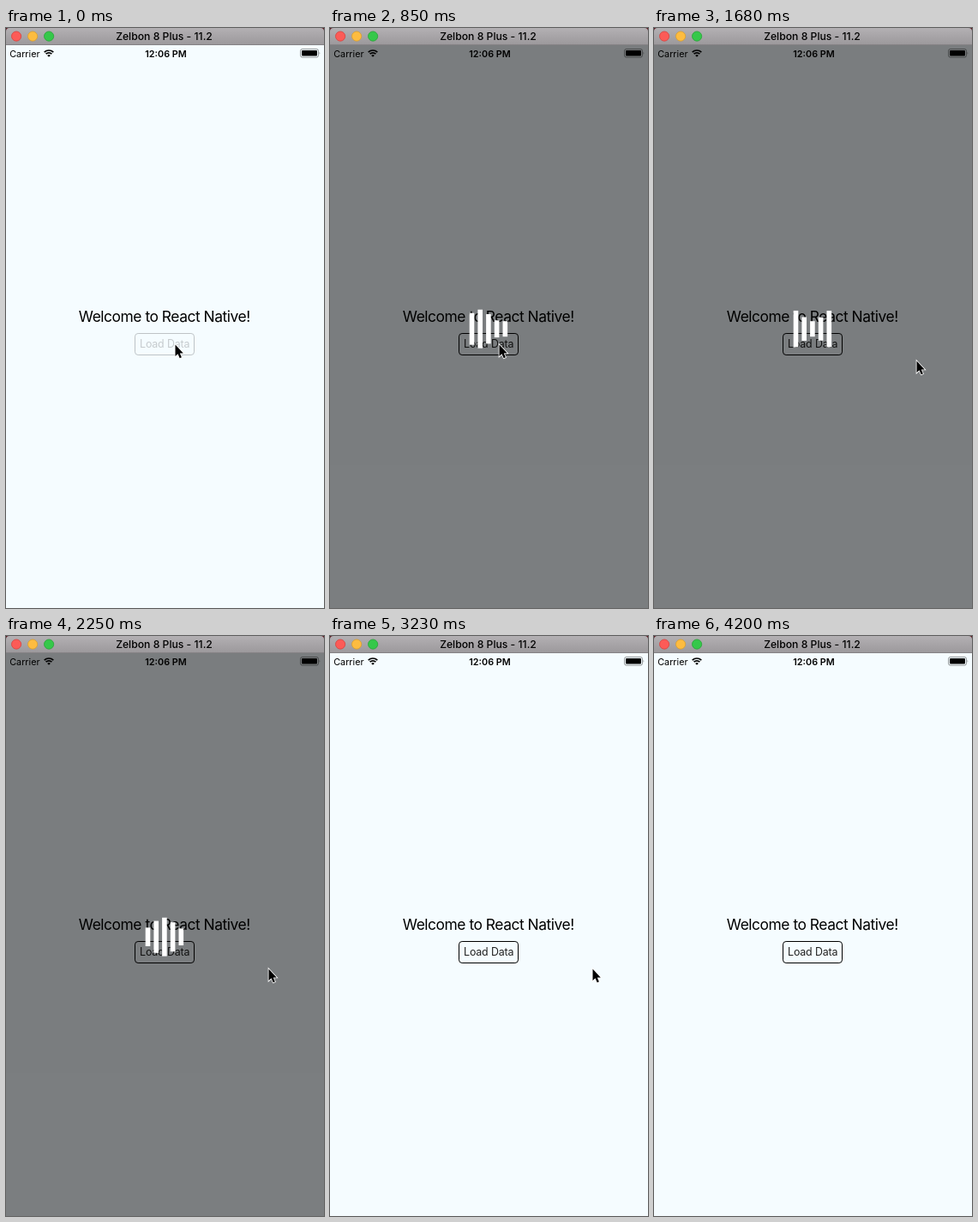
These frames come from a looping animation (371x675 px, 4.48 s). An HTML page:

```html
<!DOCTYPE html>
<html lang="en">
<head>
<meta charset="utf-8">
<title>Loading overlay</title>
<style>
  html, body { margin: 0; width: 100%; height: 100%; overflow: hidden; background: #f5fcff; }
  svg { display: block; width: 371px; height: 675px; }
  text { font-family: Inter, Roboto, sans-serif; text-anchor: middle; }
</style>
</head>
<body>
<svg viewBox="0 0 371 675">
  <defs>
    <linearGradient id="chrome" x2="0" y2="1">
      <stop stop-color="#b3b0b3"/>
      <stop offset="1" stop-color="#9b989b"/>
    </linearGradient>
  </defs>
  <rect width="371" height="675" fill="#f5fcff"/>

  <!-- window title bar -->
  <rect width="371" height="6" fill="#5a1a22"/>
  <path d="M0 20V4Q0 0 4 0H367Q371 0 371 4V20Z" fill="url(#chrome)"/>
  <path d="M0 19.5H371" stroke="#858285"/>
  <g stroke-width=".8">
    <circle cx="12.1" cy="9.6" r="5.6" fill="#fc5b57" stroke="#d8403d"/>
    <circle cx="31.1" cy="9.6" r="5.6" fill="#fdbc40" stroke="#d99f2c"/>
    <circle cx="50.1" cy="9.6" r="5.6" fill="#35c84a" stroke="#26a437"/>
  </g>
  <text x="184.5" y="14.3" font-size="12.2" font-weight="500">Zelbon 8 Plus - 11.2</text>

  <!-- status bar -->
  <text x="4.2" y="33.6" font-size="10.8" style="text-anchor:start">Carrier</text>
  <g fill="none" stroke="#000" stroke-width="1.7">
    <path d="M44.7 28.2A7.5 7.5 0 0 1 55.3 28.2M46.6 30.2A4.8 4.8 0 0 1 53.4 30.2"/>
    <path d="M50 33.8L48.2 32A2.5 2.5 0 0 1 51.8 32Z" fill="#000" stroke="none"/>
  </g>
  <text x="186.5" y="33.6" font-size="10.8" font-weight="600">12:06 PM</text>
  <rect x="343.5" y="24.5" width="21" height="9.6" rx="2.2" fill="none" stroke="#000" stroke-opacity=".4"/>
  <rect x="345" y="26" width="18" height="6.6" rx="1" fill="#000"/>
  <path d="M365.6 27.6Q367 29.3 365.6 31Z" fill-opacity=".5"/>

  <!-- app -->
  <text x="184.8" y="341.6" font-size="17.4" letter-spacing="-.46">Welcome to React Native!</text>
  <g id="button">
    <rect x="150.5" y="355.5" width="69" height="25" rx="3.6" fill="none" stroke="#000"/>
    <text x="185.2" y="372.2" font-size="12.4" letter-spacing="-.13" fill="#222">Load Data</text>
  </g>
  <g id="overlay">
    <rect y="20" width="371" height="655" fill-opacity=".5"/>
    <g id="bars" fill="#fff"></g>
  </g>
  <path id="cursor" d="M0 0V13.6L3 10.8L5.2 15.8L7.4 14.8L5.3 10H9.3Z"
        stroke="#fff" stroke-width="1.6" paint-order="stroke"/>
</svg>
<script>
const STEP = 140, LOOP = 32 * STEP, SHOW = 2 * STEP, HIDE = 23 * STEP, LEAVE = 30 * STEP;
const BARS = 5, LOW = 18, HIGH = 45, BEAT = 1200, LAG = 240;
const $ = id => document.getElementById(id);

// pointer stops: time, x, y
const stops = [
  [980, 197.5, 368.5], [1500, 306.5, 387.5], [3360, 306.5, 387.5],
  [3640, 279.5, 387.5], [3780, 275.5, 410.5], [4060, 308.5, 670.5]
];

const bars = Array.from({ length: BARS }, (_, i) => {
  const bar = document.createElementNS("http://www.w3.org/2000/svg", "rect");
  bar.setAttribute("x", 162.7 + 9.7 * i);
  bar.setAttribute("width", 5.6);
  return $("bars").appendChild(bar);
});

function barHeight(time) {
  const swing = (1 - Math.cos(2 * Math.PI * Math.max(0, time) / BEAT)) / 2;
  return LOW + (HIGH - LOW) * swing;
}

// glide from stop to stop, slowing down on arrival
function pointerAt(t) {
  let [, x, y] = stops[0];
  for (let i = 1; i < stops.length; i++) {
    const [from] = stops[i - 1], [to, nextX, nextY] = stops[i];
    const p = Math.min(1, Math.max(0, (t - from) / (to - from)));
    const eased = p * (2 - p);
    x += (nextX - x) * eased;
    y += (nextY - y) * eased;
  }
  return [x, y];
}

const show = (id, on) => $(id).setAttribute("visibility", on ? "visible" : "hidden");

function draw(t) {
  $("button").setAttribute("opacity", t < SHOW ? .22 : 1);
  show("overlay", t >= SHOW && t < HIDE);
  show("cursor", t < LEAVE);
  bars.forEach((bar, i) => {
    const h = barHeight(1.025 * t - 40 - i * LAG);
    bar.setAttribute("y", 350.2 - h / 2);
    bar.setAttribute("height", h);
  });
  $("cursor").setAttribute("transform", `translate(${pointerAt(t)})`);
}

const start = performance.now();
function tick() {
  const t = (performance.now() - start) % LOOP;
  draw(Math.floor(t / STEP) * STEP); // the picture advances in even steps
  requestAnimationFrame(tick);
}
tick();
</script>
</body>
</html>
```
